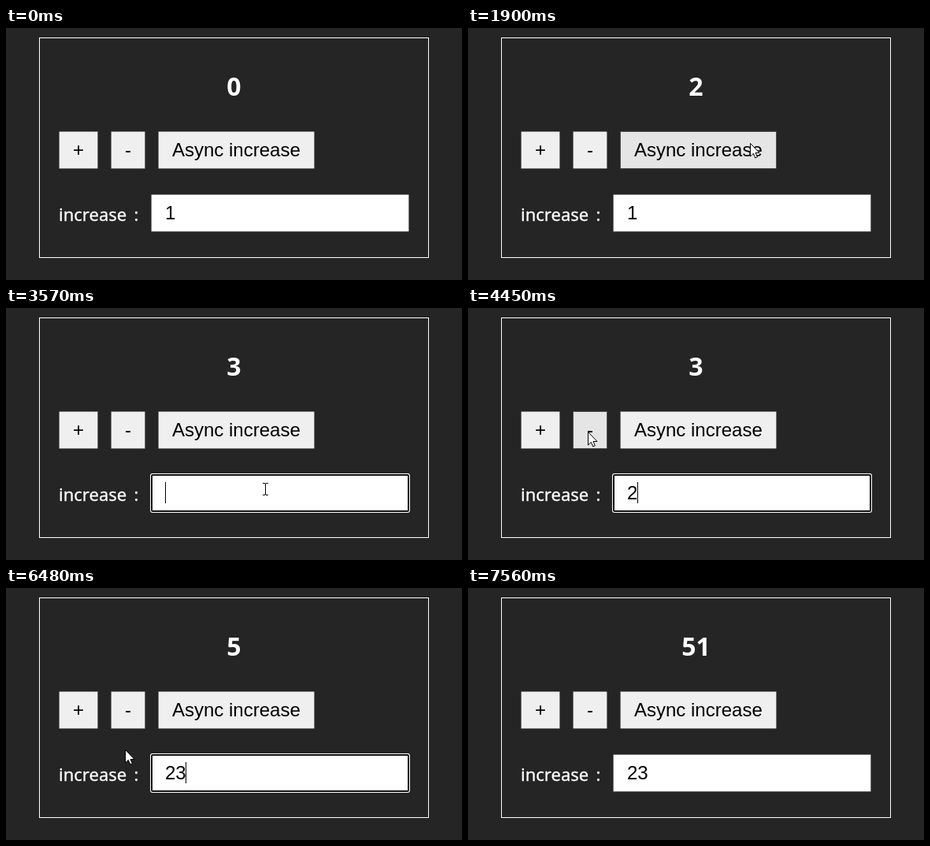
These frames come from a looping animation (579 by 320 pixels, 7760 ms). An HTML page:

```html
<!DOCTYPE html>
<html lang="en">
<head>
<meta charset="utf-8">
<title>Counter</title>
<style>
  html, body { margin: 0; width: 100%; height: 100%; overflow: hidden; background: #252525; }
  svg { display: block; width: 579px; height: 320px; }
  text { font: 24px "Liberation Sans", Arial, sans-serif; fill: #000; }
  .mid { text-anchor: middle; }
  .label { font: 22px "Noto Sans", sans-serif; fill: #fff; stroke: #fff; stroke-width: .3px; }
  .count { font: bold 32px "Noto Sans", sans-serif; fill: #fff; }
  .box { fill: #efefef; stroke: #767676; }
  .box.hover { fill: #e5e5e5; stroke: #4f4f4f; }
  .box.active { fill: #f5f5f5; stroke: #8d8d8d; }
  #field { fill: #fff; }
</style>
</head>
<body>
<svg viewBox="0 0 579 320">
  <rect x="42.5" y="12.5" width="494" height="279" fill="none" stroke="#fff"/>
  <text id="count" class="count mid" x="289.5" y="86">0</text>

  <rect id="plus" class="box" x="67.5" y="131.5" width="49" height="47" rx="1"/>
  <rect id="minus" class="box" x="133.5" y="131.5" width="43" height="47" rx="1"/>
  <rect id="async" class="box" x="193.5" y="131.5" width="198" height="47" rx="1"/>
  <text class="mid" x="92" y="163">+</text>
  <text class="mid" x="155" y="163">-</text>
  <text x="211" y="163">Async increase</text>

  <text class="label" x="67" y="245">increase</text>
  <text class="label mid" x="165.5" y="245">:</text>
  <rect id="field" class="box" x="184.5" y="211.5" width="327" height="47" rx="1"/>
  <g id="ring">
    <rect x="183" y="210" width="330" height="50" rx="3" fill="#fff"/>
    <rect x="185" y="212" width="326" height="46" rx="1.5" fill="#fff" stroke="#101010" stroke-width="2"/>
  </g>
  <text id="value" x="202" y="243">1</text>
  <path id="caret" stroke="#000" d="M0 221V248"/>

  <path id="arrow" fill="#fff" stroke="#000" d="M.5 .5V17L4.3 13.4 6.8 19 9.4 17.9 7 12.5H12Z"/>
  <path id="beam" fill="none" stroke="#000" d="M-3 -7.5H-1Q.5 -7.5 .5 -6V6Q.5 7.5 -1 7.5H-3M4 -7.5H2Q.5 -7.5 .5 -6M.5 6Q.5 7.5 2 7.5H4"/>
</svg>
<script>
  const LOOP = 7760, ENTER = 260, LEAVE = 7560;
  const STEP = 68, PHASE = 12;   // pointer refresh
  const GLIDE = 240, PRESS = 70, DELAY = 1000;
  const DIGIT = 13.35;           // advance of one digit in the field

  const $ = id => document.getElementById(id);
  const boxes = [...document.querySelectorAll('.box')];
  const spots = { plus: [93, 159], minus: [152, 157], async: [358, 146], field: [329, 230] };

  // Where the pointer goes, and when it arrives
  const stops = [
    { at: ENTER, to: [146, 291] },
    { at: 500, to: spots.plus },
    { at: 1236, to: [119, 157] },
    { at: 1380, to: spots.async },
    { at: 2300, to: spots.field },
    { at: 4280, to: spots.minus },
    { at: 4800, to: spots.plus },
    { at: 5384, to: [168, 187] },
    { at: 5640, to: spots.field },
    { at: 6472, to: [151, 205] },
    { at: 6670, to: spots.plus },
    { at: 7450, to: [572, 308] }
  ];

  // Clicks are timed by the button's release
  const events = [
    { at: 900, click: 'plus' }, { at: 1100, click: 'plus' },
    { at: 1895, click: 'async' }, { at: 3365, click: 'field' },
    { at: 3565, key: 'Backspace' }, { at: 3895, key: '2' },
    { at: 4560, click: 'minus' },
    { at: 4940, click: 'plus' }, { at: 5100, click: 'plus' },
    { at: 5800, click: 'field' }, { at: 6265, key: '3' },
    { at: 6870, click: 'plus' }, { at: 7080, click: 'plus' }
  ];

  // Replay everything the user has done up to time t
  function replay(t) {
    const state = { count: 0, value: '1', focus: false, pressed: null };
    for (const { at, click, key } of events) {
      if (key && t >= at) {
        state.value = key === 'Backspace' ? state.value.slice(0, -1) : state.value + key;
      }
      if (!click || t < at - PRESS) continue;
      state.focus = click === 'field';
      if (t < at) state.pressed = click;
      const done = click === 'async' ? at + DELAY : at;
      if (click !== 'field' && t >= done) {
        state.count += click === 'minus' ? -state.value : +state.value;
      }
    }
    return state;
  }

  function pointer(t) {
    t = Math.floor((t - PHASE) / STEP) * STEP + PHASE;
    let [x, y] = stops[0].to;
    for (let i = 1; i < stops.length; i++) {
      const { at, to } = stops[i];
      const start = Math.max(stops[i - 1].at, at - GLIDE);
      const u = Math.min(1, Math.max(0, (t - start) / (at - start)));
      const k = u * u * (3 - 2 * u);
      x += (to[0] - x) * k;
      y += (to[1] - y) * k;
    }
    return [Math.round(x), Math.round(y)];
  }

  // A button keeps its hover for a few pixels after the pointer leaves
  function hits(el, x, y) {
    const b = el.getBBox(), pad = 5;
    return x >= b.x - pad && x <= b.x + b.width + pad && y >= b.y && y <= b.y + b.height;
  }

  const show = (el, on) => el.setAttribute('visibility', on ? 'visible' : 'hidden');
  const move = (el, x, y) => el.setAttribute('transform', `translate(${x} ${y})`);

  function draw(t) {
    const { count, value, focus, pressed } = replay(t);
    const [x, y] = pointer(t);
    const visible = t >= ENTER && t < LEAVE;
    const over = visible ? boxes.find(b => hits(b, x, y)) : null;
    const inField = over === $('field');

    for (const b of boxes) {
      b.classList.toggle('hover', b === over && !inField);
      b.classList.toggle('active', b.id === pressed && !inField);
    }
    $('field').style.stroke = inField ? '#4f4f4f' : '';

    $('count').textContent = count;
    $('value').textContent = value;
    show($('ring'), focus);
    show($('caret'), focus);
    move($('caret'), Math.floor(202 + DIGIT * value.length) + .5, 0);

    show($('arrow'), visible && !inField);
    show($('beam'), inField);
    move($('arrow'), x, y);
    move($('beam'), x, y);
  }

  const begin = performance.now();
  function tick() {
    draw((performance.now() - begin) % LOOP);
    requestAnimationFrame(tick);
  }
  tick();
</script>
</body>
</html>
```
